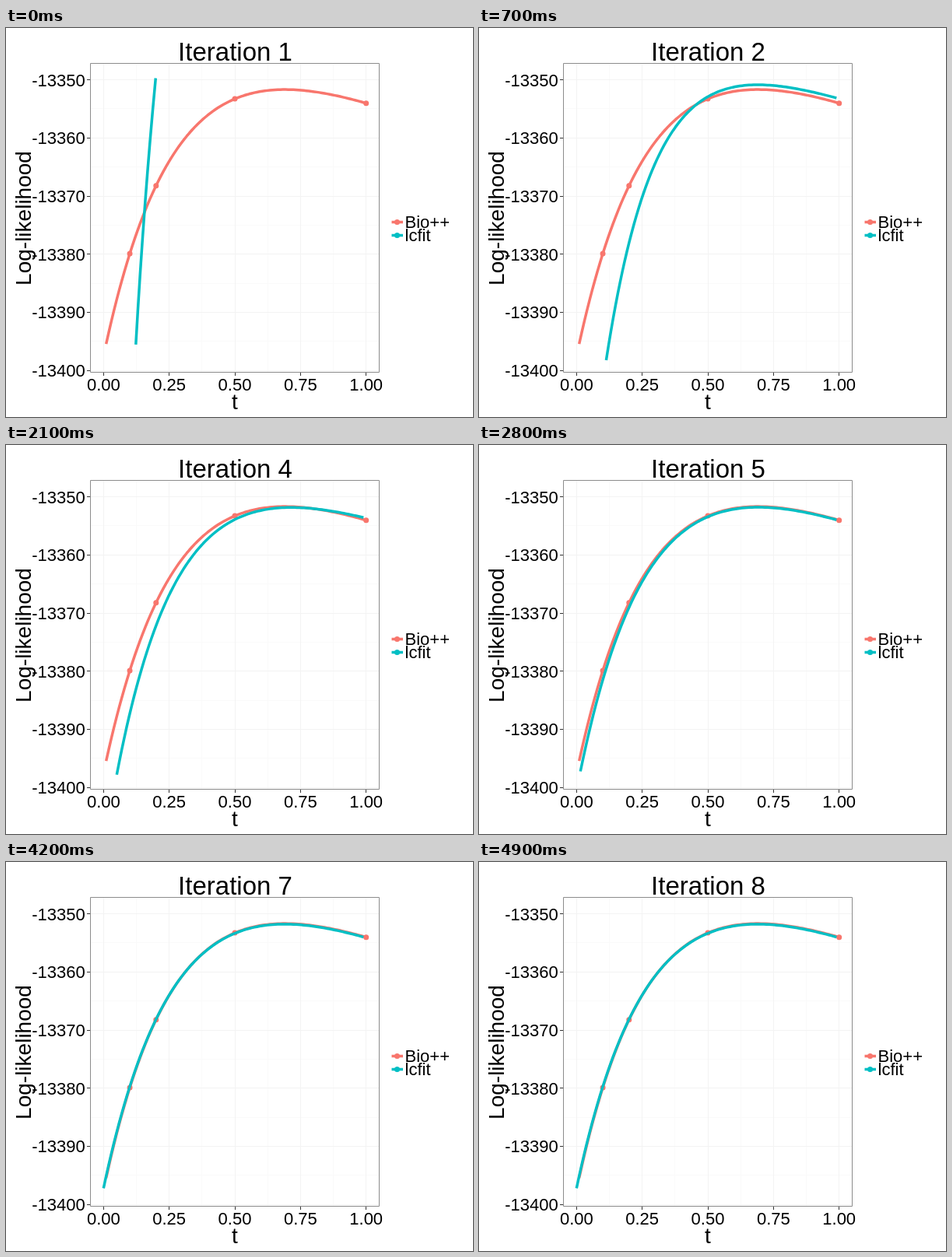
An HTML page with a canvas for the animation above (6.3 s loop, 600x500 px).

```html
<!DOCTYPE html>
<html>
<head>
<meta charset="utf-8">
<style>
html, body { margin: 0; width: 100%; height: 100%; overflow: hidden; background: #fff; }
canvas { display: block; }
</style>
</head>
<body>
<canvas id="stage" width="600" height="500"></canvas>
<script>
const ctx = document.getElementById('stage').getContext('2d');
const RED = '#f8766d', TEAL = '#00bfc4';
const STEP = 700, LOOP = 6300;
const px = t => 125.3 + 337.4 * t;

// Fitted curves: peak height, peak time, rate, scale, first t, last t
const truth = [79.1, 0.691, 3.62, 39.4, 0.01, 1];
const fits = [
  null,
  [73, 0.69, 5.2, 22, 0.113, 0.99],
  [75.3, 0.697, 4.8, 24.6, 0.0945, 0.99],
  [80.3, 0.715, 4.2, 27.45, 0.0504, 0.99],
  [80, 0.692, 3.8, 35.6, 0.0148, 0.99],
  [79.9, 0.69, 3.62, 39.2, 0, 0.99]
];

function height([peak, t0, rate, scale], t) {
  const s = rate * (t - t0);
  return peak + scale * (Math.exp(-s) + s - 1);
}

function line(x1, y1, x2, y2, color, width = 1) {
  ctx.strokeStyle = color;
  ctx.lineWidth = width;
  ctx.beginPath();
  ctx.moveTo(x1, y1);
  ctx.lineTo(x2, y2);
  ctx.stroke();
}

function text(str, x, y, size, align = 'center') {
  ctx.font = size + 'px "Liberation Sans", Arial, sans-serif';
  ctx.textAlign = align;
  ctx.fillStyle = '#000';
  ctx.fillText(str, x, y);
}

function dot(x, y, color) {
  ctx.fillStyle = color;
  ctx.beginPath();
  ctx.arc(x, y, 3.5, 0, 7);
  ctx.fill();
}

function curve(fit, color) {
  const [first, last] = fit.slice(4);
  ctx.strokeStyle = color;
  ctx.lineWidth = 3.5;
  ctx.lineJoin = 'round';
  ctx.beginPath();
  for (let i = 0; i <= 100; i++) {
    const t = first + (last - first) * i / 100;
    ctx.lineTo(px(t), height(fit, t));
  }
  ctx.stroke();
}

// Nearly straight first guess, cut off at the top of the plot
function steepCurve() {
  ctx.strokeStyle = TEAL;
  ctx.lineWidth = 3.5;
  ctx.beginPath();
  ctx.moveTo(166.8, 406.8);
  ctx.quadraticCurveTo(177.5, 220, 192.3, 64.5);
  ctx.stroke();
}

function axes() {
  const gridX = (x, color) => line(x, 46, x, 442, color);
  const gridY = (y, color) => line(109, y, 479, y, color);
  const tickX = i => Math.floor(px(i / 4)) + 0.5;
  const tickY = i => Math.floor(66.6 + 74.7 * i) + 0.5;
  for (let i = 0; i < 4; i++) gridX(tickX(i + 0.5), '#fafafa');
  for (let i = 0; i < 5; i++) gridY(tickY(i + 0.5), '#fafafa');
  for (let i = 0; i < 5; i++) gridX(tickX(i), '#f3f3f3');
  for (let i = 0; i < 6; i++) gridY(tickY(i), '#f3f3f3');
  ctx.strokeStyle = '#8c8c8c';
  ctx.lineWidth = 1;
  ctx.strokeRect(108.5, 45.5, 371, 397);
  for (let i = 0; i < 5; i++) {
    line(tickX(i), 443, tickX(i), 447, '#333');
    text((i / 4).toFixed(2), px(i / 4), 466, 22);
  }
  for (let i = 0; i < 6; i++) {
    line(104, tickY(i), 108, tickY(i), '#333');
    text(-13350 - 10 * i, 101.8, 74.5 + 74.7 * i, 22, 'right');
  }
  text('t', 294, 490, 28);
  ctx.save();
  ctx.translate(31.5, 244.5);
  ctx.rotate(-Math.PI / 2);
  text('Log-likelihood', 0, 0, 28);
  ctx.restore();
}

function legend(label, y, color) {
  line(495.5, y, 510, y, color, 3.5);
  dot(502.5, y, color);
  text(label, 512.5, y + 7.5, 22, 'left');
}

function draw(now) {
  const step = Math.min(7, Math.floor(now % LOOP / STEP));
  ctx.fillStyle = '#fff';
  ctx.fillRect(0, 0, 600, 500);
  axes();
  for (const t of [0.1, 0.2, 0.5, 1]) dot(px(t), height(truth, t), RED);
  curve(truth, RED);
  if (step) curve(fits[Math.min(step, 5)], TEAL);
  else steepCurve();
  legend('Bio++', 249.5, RED);
  legend('lcfit', 266.5, TEAL);
  text('Iteration ' + (step + 1), 294.5, 42, 33);
}

const start = performance.now();
function tick() {
  draw(performance.now() - start);
  requestAnimationFrame(tick);
}
tick();
</script>
</body>
</html>
```
